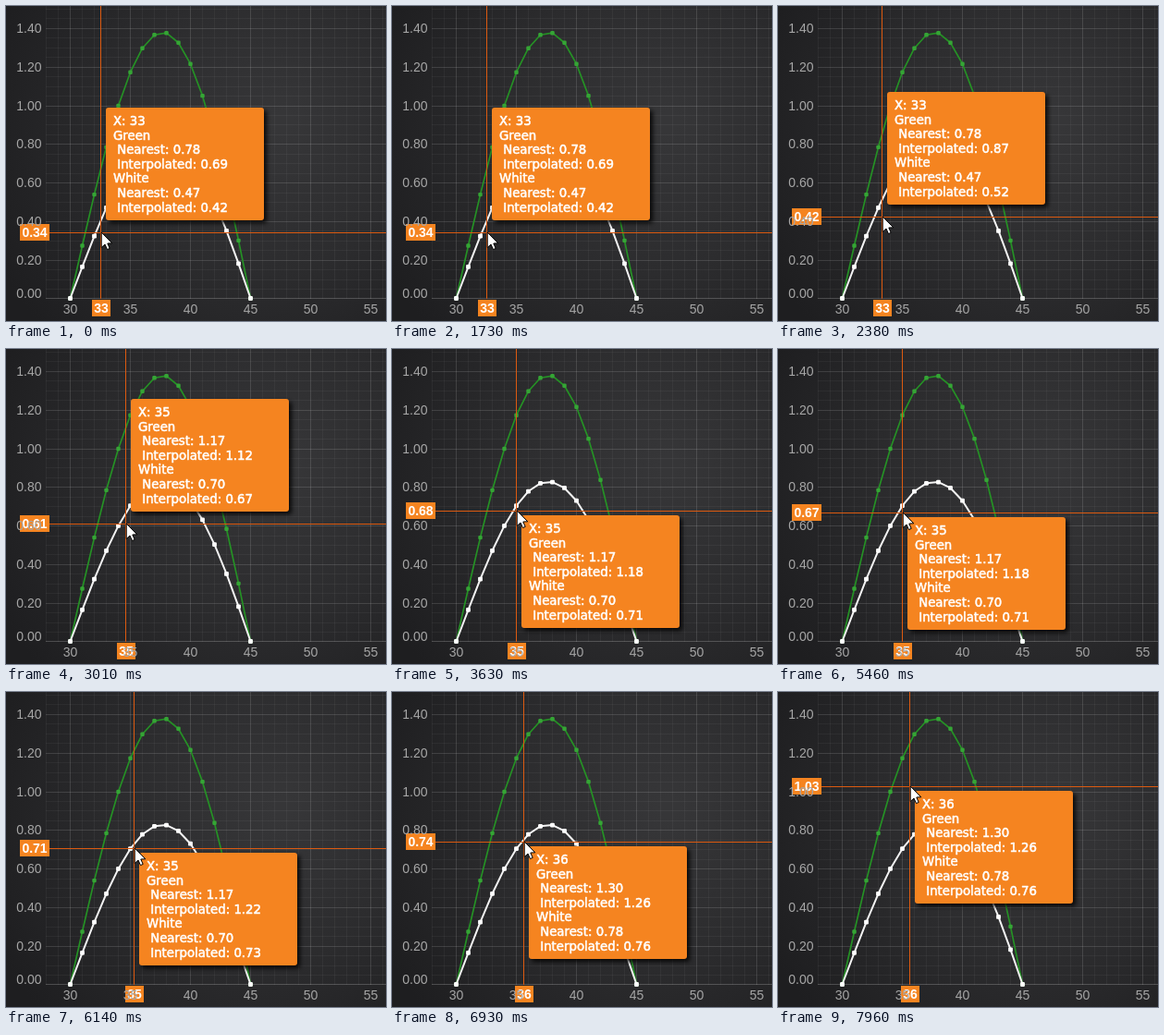
Write an HTML page with a canvas that moves like this. It is 411 px wide and 341 px high and loops after 8000 ms.

```html
<!DOCTYPE html>
<html lang="en">
<head>
<meta charset="utf-8">
<title>Chart cursor</title>
<style>
html, body { margin: 0; width: 100%; height: 100%; overflow: hidden; background: #262628; }
canvas { display: block; }
</style>
</head>
<body>
<canvas id="chart" width="411" height="341"></canvas>
<script>
const W = 411, H = 341, LOOP = 8000;
const X0 = 69.5, UX = 13, Y0 = 316.5, UY = 209, LEFT = 43;
const ORANGE = '#f58420', HAIR = '#dc5a10';
const AXIS_FONT = '14px "Liberation Sans", Arial, sans-serif';
const ctx = document.getElementById('chart').getContext('2d');
const arrow = new Path2D('M0 0V16.5L3.8 13L6.3 18.6L9 17.4L6.6 12L11.6 11.8Z');

// Pointer moves: start, end, x, y; it rests in between
const moves = [
  [240, 250, 103, 245], [290, 300, 102, 245],
  [1730, 2520, 113, 227], [2550, 3270, 133, 179],
  [3390, 3450, 133, 175], [3620, 3640, 134, 175],
  [3840, 4450, 126, 187], [4880, 5460, 134, 177],
  [5700, 6440, 140, 166], [6750, 7230, 144, 158],
  [7540, 7960, 142, 102]
];

const px = t => X0 + t * UX;
const py = v => Y0 - v * UY;
const green = t => Math.sin(Math.PI * t / 15) * (1.3023 + 0.01 * t);
const white = t => 0.6 * green(t);
const easeOut = p => 1 - Math.pow(1 - p, 1.5);

function lerpAt(f, t) {
  const i = Math.floor(t);
  return f(i) + (t - i) * (f(i + 1) - f(i));
}

function pointer(time) {
  let x = 102, y = 245;
  for (const [start, end, toX, toY] of moves) {
    if (time < start) break;
    const k = easeOut(Math.min(1, (time - start) / (end - start)));
    x += (toX - x) * k;
    y += (toY - y) * k;
  }
  return [Math.round(x), Math.round(y)];
}

function rect(x, y, w, h, color) {
  ctx.fillStyle = color;
  ctx.fillRect(x, y, w, h);
}

const vLine = (x, color) => rect(Math.floor(x), 0, 1, Y0 + 0.5, color);
const hLine = (y, color) => rect(LEFT, Math.round(y), W - LEFT, 1, color);

function text(s, x, y, font, color, align) {
  ctx.font = font;
  ctx.fillStyle = color;
  ctx.textAlign = align;
  ctx.fillText(s, x, y);
}

function drawBackground() {
  const g = ctx.createRadialGradient(300, 125, 10, 260, 145, 300);
  g.addColorStop(0, '#363638');
  g.addColorStop(0.5, '#2c2c2e');
  g.addColorStop(1, '#1e1e20');
  rect(0, 0, W, H, g);
  const minor = 'rgba(255,255,255,0.045)', major = 'rgba(255,255,255,0.13)';
  for (let i = -2; i <= 26; i++) vLine(px(i), i % 5 ? minor : major);
  for (let i = 1; i <= 30; i++) hLine(py(i * 0.05), i % 4 ? minor : major);
  hLine(Y0 - 0.5, 'rgba(255,255,255,0.2)');
}

function drawAxisLabels() {
  for (let i = 0; i <= 7; i++) {
    const y = i ? py(i * 0.2) + 5 : Y0 - 0.5;
    text((i * 0.2).toFixed(2), 38.5, y, AXIS_FONT, '#a6a6a6', 'right');
  }
  for (let i = 0; i <= 25; i += 5) text(30 + i, px(i), 333, AXIS_FONT, '#a6a6a6', 'center');
}

function drawSeries(f, color, dot, width, size) {
  ctx.strokeStyle = color;
  ctx.lineWidth = width;
  ctx.lineJoin = 'round';
  ctx.beginPath();
  for (let i = 0; i <= 15; i++) ctx.lineTo(px(i), py(f(i)));
  ctx.stroke();
  ctx.fillStyle = dot;
  for (let i = 0; i <= 15; i++) {
    ctx.beginPath();
    ctx.roundRect(px(i) - size / 2, py(f(i)) - size / 2, size, size, 1.2);
    ctx.fill();
  }
}

function drawBadges(x, y, near) {
  const font = 'bold ' + AXIS_FONT;
  rect(15, y - 9, 32, 18, ORANGE);
  rect(x - 9, 318, 20, 18, ORANGE);
  text(((Y0 - y) / UY).toFixed(2), 31, y + 4.5, font, '#fff', 'center');
  text(30 + near, x + 1, 332, font, '#fff', 'center');
}

function drawTooltip(x, y, t, near) {
  const left = x + 6, top = y < 185 ? y + 5 : y - 135;
  ctx.save();
  ctx.shadowColor = 'rgba(0,0,0,0.85)';
  ctx.shadowBlur = 5;
  ctx.shadowOffsetX = ctx.shadowOffsetY = 3;
  ctx.fillStyle = ORANGE;
  ctx.beginPath();
  ctx.roundRect(left, top, 171, 122, 3);
  ctx.fill();
  ctx.restore();

  const rows = (name, f) => [
    name,
    ' Nearest: ' + f(near).toFixed(2),
    ' Interpolated: ' + lerpAt(f, t).toFixed(2)
  ];
  const lines = ['X: ' + (30 + near), ...rows('Green', green), ...rows('White', white)];
  ctx.strokeStyle = '#fff';
  ctx.lineWidth = 0.55;
  lines.forEach((s, i) => {
    const base = top + 19 + i * 15.6;
    text(s, left + 8, base, '13.3px "DejaVu Sans", Verdana, sans-serif', '#fff', 'left');
    ctx.strokeText(s, left + 8, base);
  });
}

function drawArrow(x, y) {
  ctx.save();
  ctx.translate(x, y);
  ctx.fillStyle = '#fff';
  ctx.fill(arrow);
  ctx.strokeStyle = '#000';
  ctx.lineWidth = 1;
  ctx.stroke(arrow);
  ctx.restore();
}

function draw(time) {
  const [x, y] = pointer(time);
  const t = (x + 1.75 - X0) / UX;
  const near = Math.round(t);

  drawBackground();
  drawSeries(green, '#259125', '#35a535', 1.7, 4.4);
  drawSeries(white, '#f4f4f4', '#fff', 2, 4.8);
  hLine(y, HAIR);
  vLine(x, HAIR);
  drawBadges(x, y, near);
  drawAxisLabels();
  drawTooltip(x, y, t, near);
  drawArrow(x + 1.2, y);
}

function frame() {
  draw(performance.now() % LOOP);
  requestAnimationFrame(frame);
}
frame();
</script>
</body>
</html>
```
